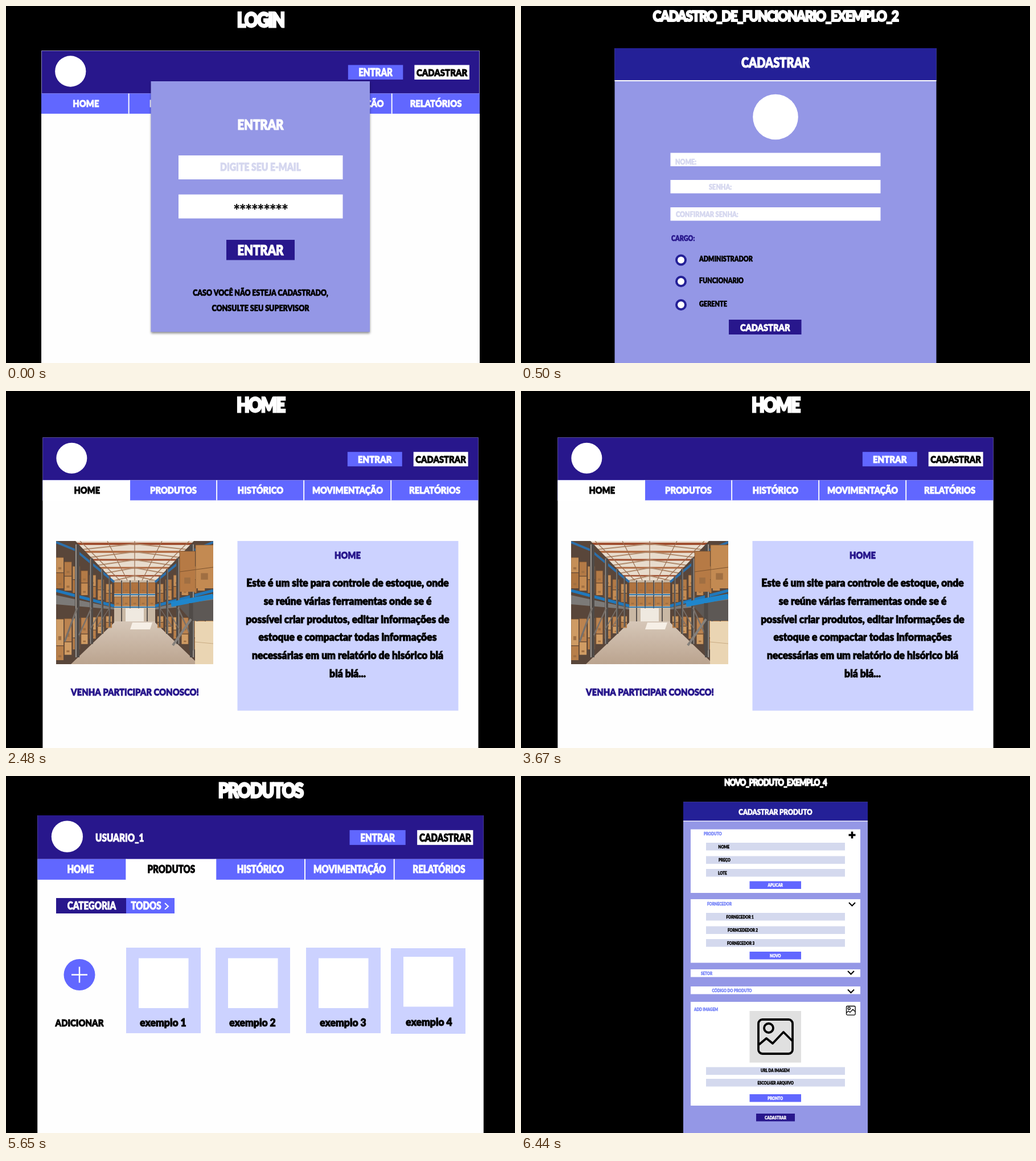
An HTML page with a canvas that plays this animation: 894 px wide and 626 px high, repeating every 8000 ms.

```html
<!DOCTYPE html>
<html lang="pt">
<head>
<meta charset="utf-8">
<title>Controle de estoque</title>
<style>
html, body { margin: 0; width: 100%; height: 100%; overflow: hidden; background: #000; }
canvas { display: block; }
</style>
</head>
<body>
<canvas id="stage" width="894" height="626"></canvas>
<script>
const ctx = document.getElementById('stage').getContext('2d');
const WHITE = '#fff', BLACK = '#000', DARK = '#28178c', NAVY = '#242097', LILAC = '#9497e6',
  BRIGHT = '#6167ff', PALE = '#ccd2ff', GREY = '#d4d9ee', HINT = '#d5d7ef', LABEL = '#7482f8';
// The face has narrow capitals and nearly regular small letters.
const CAPS = 0.84, SMALL = 0.97;
const LOOP = 8000;

// Boxes are given by their edges.
function box(l, t, r, b, color) {
  ctx.fillStyle = color;
  ctx.fillRect(l, t, r - l, b - t);
}

function disc(x, y, r, color) {
  ctx.fillStyle = color;
  ctx.beginPath();
  ctx.arc(x, y, r, 0, Math.PI * 2);
  ctx.fill();
}

function trace(points) {
  ctx.beginPath();
  for (let i = 0; i < points.length; i += 2) ctx.lineTo(points[i], points[i + 1]);
}

function poly(color, ...points) {
  trace(points);
  ctx.fillStyle = color;
  ctx.fill();
}

function line(color, width, ...points) {
  trace(points);
  ctx.strokeStyle = color;
  ctx.lineWidth = width;
  ctx.stroke();
}

// y is the middle of the capitals.
function text(str, x, y, size, color, align = 'center', outline = 0.05, spacing = 0) {
  ctx.save();
  ctx.translate(x, y + size * 0.36);
  ctx.scale(/[a-z]/.test(str) ? SMALL : CAPS, 1);
  ctx.font = `900 ${size}px Lato, "Open Sans", sans-serif`;
  ctx.letterSpacing = spacing * size + 'px';
  ctx.textAlign = align;
  ctx.fillStyle = ctx.strokeStyle = color;
  ctx.lineWidth = outline * size;
  ctx.miterLimit = 2;
  ctx.strokeText(str, 0, 0);
  ctx.fillText(str, 0, 0);
  ctx.restore();
}

const title = (str, y, size) => text(str, 447, y, size, WHITE, 'center', 0.08, -0.065);

function button(str, l, t, r, b, size, fill, color = WHITE) {
  box(l, t, r, b, fill);
  text(str, (l + r) / 2, (t + b) / 2 + 0.4, size, color);
}

function page(x, y, scale, active) {
  const tabs = ['HOME', 'PRODUTOS', 'HISTÓRICO', 'MOVIMENTAÇÃO', 'RELATÓRIOS'];
  const step = 766 / 5;
  ctx.save();
  ctx.translate(x, y);
  ctx.scale(scale, scale);
  box(0, 0, 766, 640, '#fefefe');
  box(0, 0, 766, 75, DARK);
  box(0, 75, 766, 110.3, BRIGHT);
  disc(51, 36.3, 27, WHITE);
  button('ENTRAR', 536, 25.3, 632, 50.7, 17.8, BRIGHT);
  button('CADASTRAR', 652, 25.3, 748, 50.7, 17.6, WHITE, BLACK);
  tabs.forEach((name, i) => {
    const left = i ? i * step - 1.3 : 0;
    if (i) box(left, 75, left + 1.9, 110.3, WHITE);
    if (i === active) box(left, 75, (i + 1) * step, 111, WHITE);
    const cx = i ? (i + 0.5) * step : active === 1 ? 74 : 78;
    text(name, cx, 92.3, 17.5, i === active ? BLACK : WHITE);
  });
  ctx.restore();
}

function stars(n, cx, y) {
  ctx.font = '900 28px Lato, "Open Sans", sans-serif';
  ctx.textAlign = 'center';
  ctx.fillStyle = '#111';
  const m = ctx.measureText('*');
  const base = y + (m.actualBoundingBoxAscent - m.actualBoundingBoxDescent) / 2;
  for (let i = 0; i < n; i++) ctx.fillText('*', cx + (i - (n - 1) / 2) * 10.6, base);
}

function login() {
  title('LOGIN', 24.5, 35);
  ctx.filter = 'blur(0.7px)';
  page(62, 78, 770 / 766, -1);
  ctx.filter = 'none';
  line('#8984bf', 1, 62.5, 153, 62.5, 78.5, 831.5, 78.5, 831.5, 153);
  ctx.save();
  ctx.shadowColor = 'rgba(0,0,0,.45)';
  ctx.shadowBlur = 4;
  ctx.shadowOffsetY = 2;
  box(254.5, 132, 639, 571.5, LILAC);
  ctx.restore();
  text('ENTRAR', 447, 208, 24.2, WHITE);
  box(303, 262, 591.5, 304, WHITE);
  text('DIGITE SEU E-MAIL', 447, 282, 18.6, HINT);
  box(303, 330.5, 591.5, 372.5, WHITE);
  stars(9, 447.5, 352);
  button('ENTRAR', 387, 410, 507, 445.5, 24.2, DARK);
  text('CASO VOCÊ NÃO ESTEJA CADASTRADO,', 447, 503, 14.7, BLACK);
  text('CONSULTE SEU SUPERVISOR', 447, 530, 14.9, BLACK);
}

function signup() {
  title('CADASTRO_DE_FUNCIONARIO_EXEMPLO_2', 17.5, 27);
  box(164.5, 74, 729.5, 626, LILAC);
  box(164.5, 74, 729.5, 130, NAVY);
  box(164.5, 130, 729.5, 132, WHITE);
  text('CADASTRAR', 447, 99.3, 23.8, WHITE);
  disc(447, 194.5, 39.8, WHITE);
  const fields = [['NOME:', 271, 257.5, 273], ['SENHA:', 330, 305, 317.5], ['CONFIRMAR SENHA:', 272, 353, 365.5]];
  for (const [str, x, top, y] of fields) {
    box(262.5, top, 631.5, top + 23.5, WHITE);
    text(str, x, y, 13.1, HINT, 'left');
  }
  text('CARGO:', 264, 407.5, 12.9, DARK, 'left');
  const roles = [['ADMINISTRADOR', 445.5], ['FUNCIONARIO', 483], ['GERENTE', 524]];
  for (const [str, y] of roles) {
    disc(281, y, 10, NAVY);
    disc(281, y, 6, WHITE);
    text(str, 313, y - 1.7, 13, BLACK, 'left');
  }
  button('CADASTRAR', 365, 550, 492.5, 576, 17.4, DARK);
}

function crate(l, t, r, b, color) {
  box(l, t, r, b, color);
  line('#7d5430', 0.8, l, b, l, t, r, t);
  box(l + (r - l) * 0.3, b - (b - t) * 0.35, l + (r - l) * 0.7, b - (b - t) * 0.2, '#a06f42');
}

function shelf(mirror) {
  // Drawn for the left side, with depth running to the middle.
  ctx.save();
  if (mirror) {
    ctx.translate(452, 0);
    ctx.scale(-1, 1);
  }
  poly('#59463a', 88, 263, 122, 263, 190, 334, 190, 406, 114, 479, 88, 479);
  for (let i = 0; i < 7; i++) {
    const x = 88 + i * 14.6, d = i / 7, w = 13 - d * 3;
    const deck = 350 + d * 28, foot = 472 - d * 66;
    crate(x, deck - 58 + d * 26, x + w, deck - 32 + d * 14, i % 2 ? '#b37a46' : '#c58f58');
    crate(x, deck - 31 + d * 14, x + w, deck - 4, i % 2 ? '#c58b52' : '#b07641');
    crate(x, deck + 50 - d * 34, x + w, foot - 26 + d * 18, i % 2 ? '#bb8350' : '#ce9b64');
    crate(x, foot - 25 + d * 18, x + w, foot, i % 2 ? '#d09c64' : '#b87f4a');
  }
  poly('#7c7a78', 88, 358, 190, 380, 190, 383, 88, 374);
  line('#2078bb', 5, 88, 350, 190, 377);
  line('#2d6faa', 4, 88, 265, 122, 279, 190, 335);
  for (const [x, w] of [[125, 8], [150, 6], [169, 4], [182, 3]]) {
    const far = (x - 124) / 66, top = 268 + far * 65, foot = 468 - far * 62;
    line('#4f4a47', w, x, top, x, foot);
    line('#9a938c', w / 4, x - w / 4, top, x - w / 4, foot);
    line('#77706a', w / 2.5, x - 22, 440 - far * 30, x, 380);
  }
  ctx.restore();
}

function warehouse() {
  ctx.save();
  ctx.beginPath();
  ctx.rect(88, 263, 276, 216);
  ctx.clip();
  box(88, 263, 364, 479, '#e8dccd');
  for (let i = 0; i < 5; i++) {
    const y = 268 + i * 14, inset = i * 15;
    line(i % 2 ? '#b06a42' : '#a04f30', 4 - i * 0.4, 105 + inset, y, 346 - inset, y);
    line('#b08a6c', 1.8, 115 + inset, y + 12, 226, y, 337 - inset, y + 12);
  }
  for (let i = 0; i < 5; i++) line('#9a6f52', 1.2, 130 + i * 48, 263, 202 + i * 12, 334);
  box(186, 332, 266, 406, '#c9b8a4');
  for (let i = 0; i < 5; i++) {
    crate(190 + i * 15, 336, 202 + i * 15, 355, '#b0733f');
    crate(190 + i * 15, 361, 202 + i * 15, 377, '#b98049');
    line('#5a5350', 2, 188 + i * 15, 332, 188 + i * 15, 404);
  }
  line('#347cb1', 2, 186, 357, 266, 357);
  line('#347cb1', 2, 186, 379, 266, 379);
  box(210, 381, 242, 404, '#efe9e0');
  const floor = ctx.createLinearGradient(0, 404, 0, 479);
  floor.addColorStop(0, '#d6c7b8');
  floor.addColorStop(1, '#bba48f');
  poly(floor, 188, 404, 264, 404, 342, 479, 106, 479);
  poly('#f6efe6', 222, 406, 257, 406, 253, 418, 218, 418);
  shelf(false);
  shelf(true);
  crate(305, 281, 332, 352, '#b67a45');
  crate(333, 270, 364, 346, '#c38a52');
  line('#7d5430', 1, 305, 317, 364, 309);
  poly('#5d5855', 300, 374, 364, 366, 364, 403, 326, 403);
  line('#1f86cc', 9, 364, 360, 290, 374);
  line('#4f4a47', 7, 325, 372, 325, 455);
  line('#85807b', 4, 325, 400, 293, 446);
  box(332, 404, 364, 479, '#ead5b3');
  line('#c9ac84', 1, 332, 440, 364, 443);
  ctx.restore();
}

function home() {
  title('HOME', 24.5, 35);
  page(64.4, 81.5, 765.2 / 766, 0);
  warehouse();
  text('VENHA PARTICIPAR CONOSCO!', 226.5, 527.5, 17.7, DARK);
  box(406.5, 263, 794.5, 560.5, PALE);
  text('HOME', 600, 288, 17.5, DARK);
  [
    'Este é um site para controle de estoque, onde',
    'se reúne várias ferramentas onde se é',
    'possível criar produtos, editar informações de',
    'estoque e compactar todas informações',
    'necessárias em um relatório de hisórico blá',
    'blá blá...'
  ].forEach((str, i) => text(str, 600, 336.5 + i * 31.8, 18, BLACK));
}

function products() {
  title('PRODUTOS', 25.5, 35);
  page(55.2, 69, 783.6 / 766, 1);
  text('USUARIO_1', 157, 108.5, 18.2, WHITE, 'left');
  box(88, 214, 211, 241, DARK);
  box(211, 214, 296, 241, BRIGHT);
  text('CATEGORIA', 150.5, 228, 17.9, WHITE);
  text('TODOS', 246, 228, 17.9, WHITE);
  line(WHITE, 2, 279, 223, 285, 228.5, 279, 234);
  disc(129, 348.5, 27.5, BRIGHT);
  line(WHITE, 2.5, 115, 348.5, 143, 348.5);
  line(WHITE, 2.5, 129, 334.5, 129, 362.5);
  text('ADICIONAR', 129, 432.5, 17.7, BLACK);
  [211, 368, 527, 676].forEach((x, i) => {
    const last = i === 3, y = last ? 302 : 301, inner = last ? 317 : 319.5;
    box(x, y, x + 131, y + 150, PALE);
    box(x + 22, inner, x + 109.5, inner + 87.5, WHITE);
    text('exemplo ' + (i + 1), x + (last ? 67 : 65), last ? 431.5 : 432.5, 18, BLACK);
  });
}

function picture(x, y, size, width) {
  const k = size / 60;
  ctx.save();
  ctx.translate(x, y);
  ctx.scale(k, k);
  ctx.lineJoin = 'round';
  ctx.strokeStyle = BLACK;
  ctx.lineWidth = width / k;
  ctx.beginPath();
  ctx.roundRect(0, 0, 60, 60, 7);
  ctx.stroke();
  ctx.beginPath();
  ctx.arc(18, 15, 8, 0, Math.PI * 2);
  ctx.stroke();
  line(BLACK, width / k, 1, 44, 14, 33, 25, 42, 44, 22, 60, 38);
  ctx.restore();
}

function newProduct() {
  const size = 7.5;
  const label = (str, x, y) => text(str, x, y, size, LABEL, 'left');
  const chevron = (x, y) => line(BLACK, 2, x - 5.5, y - 2.5, x, y + 3, x + 5.5, y - 2.5);
  const field = (str, x, top, y = top + 7) => {
    box(325, top, 569, top + 13.5, GREY);
    text(str, x, y, size, BLACK, 'left');
  };
  const action = (str, top) => button(str, 401.5, top, 492, top + 13.5, size, BRIGHT);

  title('NOVO_PRODUTO_EXEMPLO_4', 11, 16);
  box(285, 45.5, 609, 626, LILAC);
  box(285, 45.5, 609, 78.5, NAVY);
  box(285, 78.5, 609, 79.7, WHITE);
  text('CADASTRAR PRODUTO', 447, 63.5, 13.7, WHITE);
  for (const [t, b] of [[93.5, 205], [216, 327.5], [339, 352.5], [369, 382.5], [396, 578]])
    box(298, t, 596, b, WHITE);

  label('PRODUTO', 321, 101);
  line(BLACK, 3.6, 575.5, 103.5, 587.5, 103.5);
  line(BLACK, 3.6, 581.5, 97.5, 581.5, 109.5);
  field('NOME', 346.5, 117);
  field('PREÇO', 347, 140.5);
  field('LOTE', 346, 163);
  action('APLICAR', 184.5);

  label('FORNECEDOR', 327, 224);
  chevron(581.5, 224.5);
  field('FORNECEDOR 1', 360.5, 240);
  field('FORNCEDEDOR 2', 363, 263.5);
  field('FORNECEDOR 3', 362, 286);
  action('NOVO', 308);

  label('SETOR', 316, 346.5);
  chevron(579.5, 344.5);
  label('CÓDIGO DO PRODUTO', 335.5, 376.5);
  chevron(579.5, 377);

  label('ADD IMAGEM', 304, 409);
  picture(571.5, 403.5, 15.6, 1.3);
  box(401.5, 412, 492, 502.5, '#e0e0e0');
  picture(417, 427, 60, 3.8);
  field('URL DA IMAGEM', 421, 510.5, 516.5);
  field('ESCOLHER ARQUIVO', 415.5, 531);
  action('PRONTO', 558);
  button('CADASTRAR', 413, 592, 481, 605.5, size, DARK);
}

const scenes = [[0, login], [500, signup], [2480, home], [4460, products], [6440, newProduct]];
let shown = null;

function frame() {
  const t = performance.now() % LOOP;
  const draw = scenes.filter(([start]) => t >= start).pop()[1];
  if (draw !== shown) {
    shown = draw;
    box(0, 0, 894, 626, BLACK);
    draw();
  }
  requestAnimationFrame(frame);
}
frame();
</script>
</body>
</html>
```
